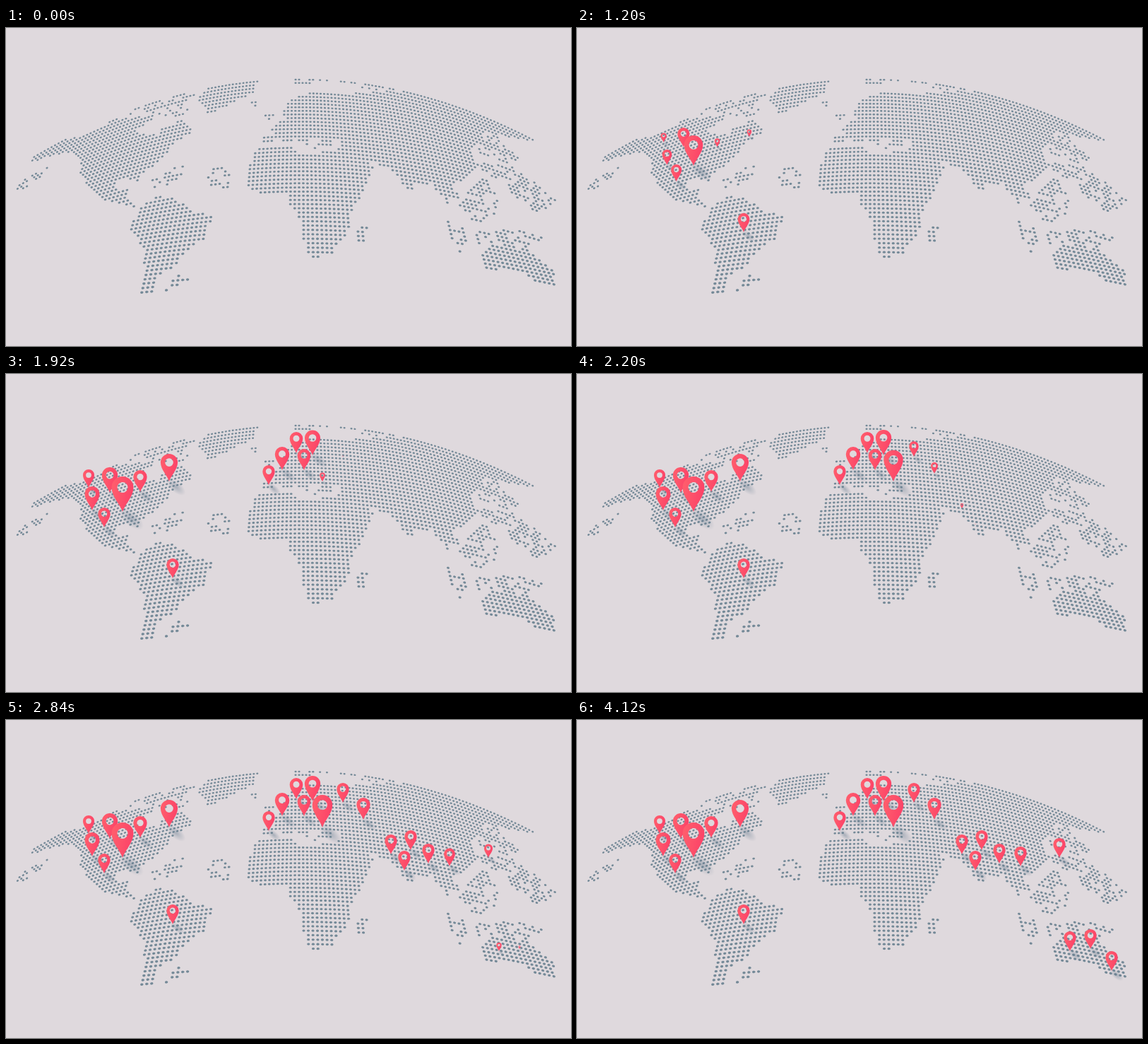
Animation, 800 px wide and 450 px high, one loop 5000 ms. Source, as an HTML page with a canvas:

```html
<!DOCTYPE html>
<html lang="en">
<head>
<meta charset="utf-8">
<title>World map with pins</title>
<style>
html, body { margin: 0; width: 100%; height: 100%; overflow: hidden; background: #dfd9dd; }
canvas { display: block; width: 800px; height: 450px; }
</style>
</head>
<body>
<canvas id="stage" width="800" height="450"></canvas>
<script>
const W = 800, H = 450, LOOP = 5000, GROW = 520;
const MID = 415, TOP = 72, HORIZON = -635;
const ctx = document.getElementById('stage').getContext('2d');

// Rough coastlines; a bent dot lattice fills them.
const land = [
  // North America
  `M33,192 38,180 66,162 108,153 152,130 212,122 205,133 186,142 190,150 214,151 220,140
   236,138 246,128 260,138 262,148 230,169 236,172 198,203 188,208 190,224 180,213 160,216
   152,228 172,229 168,240 188,252 180,254 132,241 104,208 106,184 90,176 60,182Z`,
  // Greenland and Iceland
  `M270,97 292,81 335,72 358,72 350,92 298,117 288,124Z M337,103 357,103 353,110Z`,
  // South America
  `M196,246 216,239 232,238 262,256 262,263 294,263 281,298 262,309 240,336 214,352 205,378
   190,379 198,314 180,293 176,280 186,262Z`,
  // Africa and Madagascar
  `M352,178 360,169 400,166 416,178 470,174 521,194 510,225 484,272 488,284 460,320 441,326
   428,322 415,286 417,270 402,250 402,236 360,237 341,222 342,200Z
   M498,283 513,277 506,306 498,305Z`,
  // Europe, with gaps for the inland seas
  `M361,152 380,151 376,142 394,128 392,118 402,100 428,92 500,92 500,185 462,175 474,170
   474,159 464,159 465,168 436,170 450,157 429,156 428,166 408,158 400,164 383,157 378,163
   363,163Z`,
  // Asia
  `M495,92 545,88 600,94 690,123 735,148 748,160 676,148 676,158 660,172 666,198 650,214
   632,222 642,240 624,240 634,263 614,235 602,221 578,222 573,233 544,199 495,183Z`,
  // Australia
  `M673,322 690,306 712,306 728,315 732,305 748,322 776,345 779,364 750,361 730,345 700,342
   680,345Z`
].map(d => new Path2D(d));

// Island groups, filled at random.
const islands = new Path2D(`M150,131 180,112 225,97 272,91 252,106 260,122 236,125 200,119Z
  M7,233 20,217 62,195 38,222Z M192,228 206,212 232,200 256,194 252,208 224,224Z
  M284,214 296,196 318,197 318,228 292,228Z M365,118 375,112 381,133 366,133Z
  M240,348 262,347 262,362 226,372Z M408,71 500,71 565,82 545,88 500,86 480,78 408,78Z
  M672,151 692,150 728,186 716,196 668,178Z M662,190 720,197 780,243 757,264 728,245Z
  M642,250 668,210 682,212 698,246 690,268 664,276Z M618,270 645,282 664,302 640,318Z
  M664,289 714,285 758,292 775,304 740,306 668,305Z`);

// Pins in order of appearance: tip x, tip y and, if not 28, height.
const runs = [
  { start: 740, step: 64, slide: 0, tips: [[236, 289], [165, 195, 50]] },
  { start: 800, step: 45, slide: 0.45,
    tips: [[139, 217], [147, 168, 36], [122, 193, 34], [117, 161, 26], [190, 167, 31], [231, 152, 39]] },
  { start: 1235, step: 50, slide: 0,
    tips: [[372, 157], [391, 136, 33], [411, 112, 30], [422, 136, 30], [434, 115, 36]] },
  { start: 1743, step: 96, slide: 0,
    tips: [[448, 152, 46], [477, 117], [506, 141, 31], [545, 190], [564, 213], [573, 184],
      [598, 203], [628, 207], [683, 195], [698, 327], [727, 324], [757, 355]] }
];
const pins = runs.flatMap(({ start, step, slide, tips }) =>
  tips.map(([x, y, h = 28], i) => ({ x, y, h, slide, start: start + i * step })));
pins.sort((a, b) => a.y - b.y);

const depth = y => (y - HORIZON) / 918;
const bend = y => 0.00078 - 0.0000019 * (y - TOP);
const noise = (i, j) => {
  const n = Math.sin(i * 12.99 + j * 78.23) * 43758.55;
  return n - Math.floor(n);
};

function makeMap() {
  const map = document.createElement('canvas');
  map.width = W;
  map.height = H;
  const c = map.getContext('2d');
  c.fillStyle = '#dfd9dd';
  c.fillRect(0, 0, W, H);
  c.fillStyle = '#748997';
  for (let base = TOP + 1, row = 0; base < 376; row++) {
    const size = depth(base), k = bend(base);
    for (let col = -78; col <= 78; col++) {
      const dx = col * 6.4 * size, x = MID + dx, y = base + k * dx * dx;
      const inside = path => c.isPointInPath(path, x, y);
      if (!land.some(inside) && !(inside(islands) && noise(col, row) < 0.6)) continue;
      c.beginPath();
      c.ellipse(x, y, 2.05 * size, 1.6 * size, Math.atan(2 * k * dx), 0, 7);
      c.fill();
    }
    base += 6.2 * size;
  }
  return map;
}

const pinShape = new Path2D(`M0,0 C-.06,-.2 -.31,-.43 -.31,-.69 A.31,.31 0 0 1 .31,-.69
  C.31,-.43 .06,-.2 0,0Z M.15,-.69 A.15,.15 0 1 0 -.15,-.69 A.15,.15 0 1 0 .15,-.69Z`);
const pinFill = ctx.createLinearGradient(-0.3, -0.5, 0.3, -0.4);
pinFill.addColorStop(0, '#ff5c6c');
pinFill.addColorStop(1, '#fb4268');
const shade = ctx.createRadialGradient(0, 0, 0, 0, 0, 1);
shade.addColorStop(0, 'rgba(92,116,136,.42)');
shade.addColorStop(0.5, 'rgba(92,116,136,.2)');
shade.addColorStop(1, 'rgba(92,116,136,0)');

function drawPin({ x, y, h, slide, start }, t) {
  const p = Math.min(1, Math.max(0, (t - start) / GROW));
  const s = p * p * (3 - 2 * p);
  if (s < 0.01) return;
  const away = slide * h * (1 - s);
  ctx.save();
  ctx.translate(x + away, y + 0.15 * away);
  ctx.scale(h * s, h * s);

  ctx.save();
  ctx.translate(0.25, 0.2);
  ctx.rotate(0.7);
  ctx.scale(0.42, 0.2);
  ctx.fillStyle = shade;
  ctx.fillRect(-1, -1, 2, 2);
  ctx.restore();

  ctx.fillStyle = pinFill;
  ctx.fill(pinShape, 'evenodd');
  ctx.restore();
}

const map = makeMap();

function frame(now) {
  ctx.drawImage(map, 0, 0);
  for (const pin of pins) drawPin(pin, now % LOOP);
  requestAnimationFrame(frame);
}
requestAnimationFrame(frame);
</script>
</body>
</html>
```
